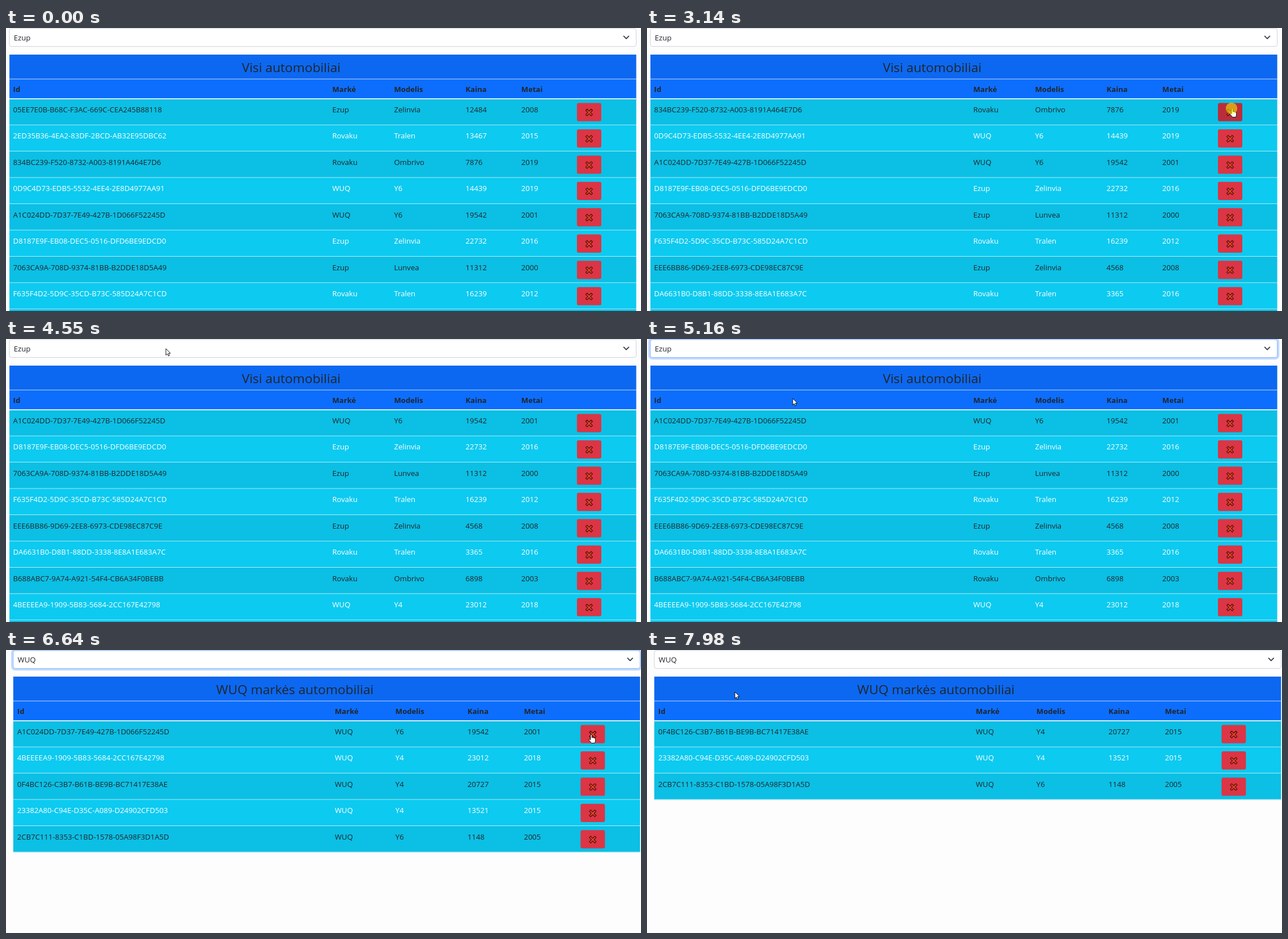
These frames come from a looping animation (1120 px wide and 500 px high, 8000 ms). An HTML page:

```html
<!DOCTYPE html>
<html lang="lt">
<head>
<meta charset="utf-8">
<title>Automobiliai</title>
<style>
html, body { margin: 0; width: 100%; height: 100%; overflow: hidden; background: #fdfdfd; }
svg { display: block; position: absolute; left: 0; top: 0; }
text { font: 13.1px "Open Sans", "Noto Sans", sans-serif; fill: #212529; }
.th { font-weight: 700; }
.title { font-size: 22.7px; text-anchor: middle; }
.light { fill: #fff; }
</style>
</head>
<body>
<svg width="1120" height="500" viewBox="0 0 1120 500">
  <defs>
    <path id="cross" d="M-6 -3.7L-3.7 -6L0 -2.4L3.7 -6L6 -3.7L2.4 0L6 3.7L3.7 6L0 2.4L-3.7 6L-6 3.7L-2.4 0Z"
      fill="#e8402c" stroke="#481406" stroke-width="1.2" stroke-linejoin="round"/>
  </defs>
  <g id="page"></g>
  <g id="cursor" stroke="#000" stroke-width=".9" stroke-linejoin="round" fill="#fff">
    <path id="arrow" d="M0 0V11.6L2.7 9.1L4.4 13L6.3 12.2L4.6 8.3H8Z"/>
    <path id="hand" d="M0 1.2Q1.3 -.6 2.6 1.2V6Q4 5 5.3 6.2Q6.6 5.6 7.4 7Q8.6 6.8 8.6 8.6V11.5Q8.4 13.5 7.2 15.5H1.5Q0 13 -2.8 10.2Q-3.4 8.6 -1.7 8.4L0 9.6Z"/>
    <circle id="press" r="10.2" fill="#ff0" fill-opacity=".52" stroke="none"/>
  </g>
</svg>
<script>
const LOOP = 8000, TICK = 67.2, FIRST = 120;
const PITCH = 46.45, TOP = 125.2;

const cars = `05EE7E0B-B68C-F3AC-669C-CEA245B88118 Ezup Zelinvia 12484 2008
2ED35B36-4EA2-83DF-2BCD-AB32E95DBC62 Rovaku Tralen 13467 2015
834BC239-F520-8732-A003-8191A464E7D6 Rovaku Ombrivo 7876 2019
0D9C4D73-EDB5-5532-4EE4-2E8D4977AA91 WUQ Y6 14439 2019
A1C024DD-7D37-7E49-427B-1D066F52245D WUQ Y6 19542 2001
D8187E9F-EB08-DEC5-0516-DFD6BE9EDCD0 Ezup Zelinvia 22732 2016
7063CA9A-708D-9374-81BB-B2DDE18D5A49 Ezup Lunvea 11312 2000
F635F4D2-5D9C-35CD-B73C-585D24A7C1CD Rovaku Tralen 16239 2012
EEE6BB86-9D69-2EE8-6973-CDE98EC87C9E Ezup Zelinvia 4568 2008
DA6631B0-D8B1-88DD-3338-8E8A1E683A7C Rovaku Tralen 3365 2016
B688ABC7-9A74-A921-54F4-CB6A34F0BEBB Rovaku Ombrivo 6898 2003
4BEEEEA9-1909-5B83-5684-2CC167E42798 WUQ Y4 23012 2018
0F4BC126-C3B7-B61B-BE9B-BC71417E38AE WUQ Y4 20727 2015
23382A80-C94E-D35C-A089-D24902CFD503 WUQ Y4 13521 2015
2CB7C111-8353-C1BD-1578-05A98F3D1A5D WUQ Y6 1148 2005`.split('\n').map(line => line.split(' '));

const views = {
  all: { left: 6, mid: 503, brand: 'Ezup', title: 'Visi automobiliai',
    cols: [12.6, 575.5, 684.5, 810.6, 908.8], button: 1007, rows: cars, cuts: [1880, 2805, 3275, 3480] },
  brand: { left: 12.8, mid: 509.5, brand: 'WUQ', title: 'WUQ markės automobiliai',
    cols: [19.8, 580, 686.8, 814, 913.4], button: 1013.4,
    rows: cars.slice(4).filter(car => car[1] === 'WUQ'), cuts: [6965, 7310] }
};
const SWITCH = 5625;
const focused = [[4820, 6860]];
const hovered = [[1300, 3545], [6690, 7375]];
const pointing = [[1300, 3545], [6625, 7375]];
const pressed = [[1740, 1805], [2670, 2800], [3070, 3205], [3345, 3475],
  [4760, 4890], [5490, 5625], [6830, 6960], [7105, 7240]];

// time, x, y of the cursor hot spot
const path = [
  [120, 1036, 453], [187, 985, 330], [255, 922, 202], [322, 929, 210], [510, 929, 210],
  [600, 917, 192], [725, 924, 182], [850, 924, 182], [1060, 965, 163], [1330, 1016, 148],
  [1590, 1031, 142], [3540, 1031, 142], [3620, 920, 95], [3740, 560, 51], [3880, 343, 84],
  [4010, 342, 81], [4130, 342, 81], [4340, 312, 45], [4545, 282, 17], [4890, 282, 17],
  [5150, 258, 106], [5470, 241, 71], [5740, 241, 71], [5895, 688, 168], [5960, 721, 176],
  [6080, 721, 176], [6300, 964, 165], [6550, 1000, 154], [6635, 1031, 149], [7370, 1031, 149],
  [7540, 610, 135], [7720, 179, 121], [7780, 179, 121], [7850, 112, 96], [7915, 128, 80], [7975, 155, 74]
];

const $ = id => document.getElementById(id);
const within = (spans, t) => spans.some(([from, to]) => t >= from && t < to);
const rect = (x, y, w, h, fill, extra = '') =>
  `<rect x="${x}" y="${y}" width="${w}" height="${h}" fill="${fill}" ${extra}/>`;
const text = (x, y, str, cls = '') => `<text x="${x}" y="${y}" class="${cls}">${str}</text>`;

function selectBox(view, focus) {
  const x = view.left, w = 1105.6;
  const ring = focus
    ? rect(x - 2, -1, w + 4, 35.6, 'none', 'rx="5.5" stroke="#0d6efd" stroke-opacity=".25" stroke-width="3.4"') : '';
  return ring + rect(x, 1, w, 31.6, '#fff', `rx="3.6" stroke="${focus ? '#86b7fe' : '#ced4da'}"`)
    + text(x + 7.8, 22.4, view.brand)
    + `<path d="M${x + 1083.6} 14.4l4.4 4.4l4.4 -4.4" fill="none" stroke="#343a40" stroke-width="1.7" stroke-linecap="round" stroke-linejoin="round"/>`;
}

function tableRow(view, car, i, hover) {
  const y = TOP + i * PITCH, odd = i % 2 === 0;
  let out = rect(view.left, y, 1105.6, PITCH, odd ? '#0cbfe4' : '#0dcaf0');
  if (car) {
    out += car.map((cell, c) => text(view.cols[c], y + 23.6, cell, odd ? '' : 'light')).join('');
    out += rect(view.button, y + 7.3, 43, 32.2, hover && !i ? '#bb2d3b' : '#dc3545', 'rx="3.2"')
      + `<use href="#cross" x="${view.button + 21.5}" y="${y + 24}"/>`;
  }
  return out + rect(view.left, y + PITCH - .9, 1105.6, 1, '#fff', 'opacity=".75"');
}

function drawPage(view, cut, focus, hover) {
  const x = view.left, w = 1105.6;
  const heads = ['Id', 'Markė', 'Modelis', 'Kaina', 'Metai'];
  const rows = view.rows.slice(cut, cut + 9);
  if (view === views.all) while (rows.length < 9) rows.push(null);
  $('page').innerHTML = selectBox(view, focus)
    + rect(x, 47, w, 43, '#0c68f0') + rect(x, 90, w, 35, '#0d6efd')
    + text(view.mid, 78.4, view.title, 'title')
    + heads.map((head, c) => text(view.cols[c], 113.3, head, 'th')).join('')
    + rows.map((car, i) => tableRow(view, car, i, hover)).join('')
    + rect(x, 89.6, w, 1, '#fff', 'opacity=".75"') + rect(x, 124.2, w, 1.7, '#f4fbff');
}

function position(t) {
  const next = path.findIndex(p => p[0] > t);
  if (next < 0) return path[path.length - 1].slice(1);
  if (!next) return path[0].slice(1);
  const [t0, x0, y0] = path[next - 1], [t1, x1, y1] = path[next];
  const k = (t - t0) / (t1 - t0);
  return [Math.round(x0 + (x1 - x0) * k), Math.round(y0 + (y1 - y0) * k)];
}

const show = (id, on) => $(id).setAttribute('visibility', on ? 'visible' : 'hidden');
let lastKey = '';

function render(t) {
  const view = t < SWITCH ? views.all : views.brand;
  const cut = view.cuts.filter(at => t >= at).length;
  const focus = within(focused, t), hover = within(hovered, t);
  const key = [view.brand, cut, focus, hover].join();
  if (key !== lastKey) {
    drawPage(view, cut, focus, hover);
    lastKey = key;
  }
  const tick = FIRST + TICK * Math.floor((t - FIRST) / TICK + .1);
  const [x, y] = position(tick);
  const visible = t >= FIRST, hand = within(pointing, t);
  $('cursor').setAttribute('transform', `translate(${x} ${y})`);
  show('arrow', visible && !hand);
  show('hand', visible && hand);
  show('press', within(pressed, t));
}

const start = performance.now();
function loop() {
  render((performance.now() - start) % LOOP);
  requestAnimationFrame(loop);
}
loop();
</script>
</body>
</html>
```
